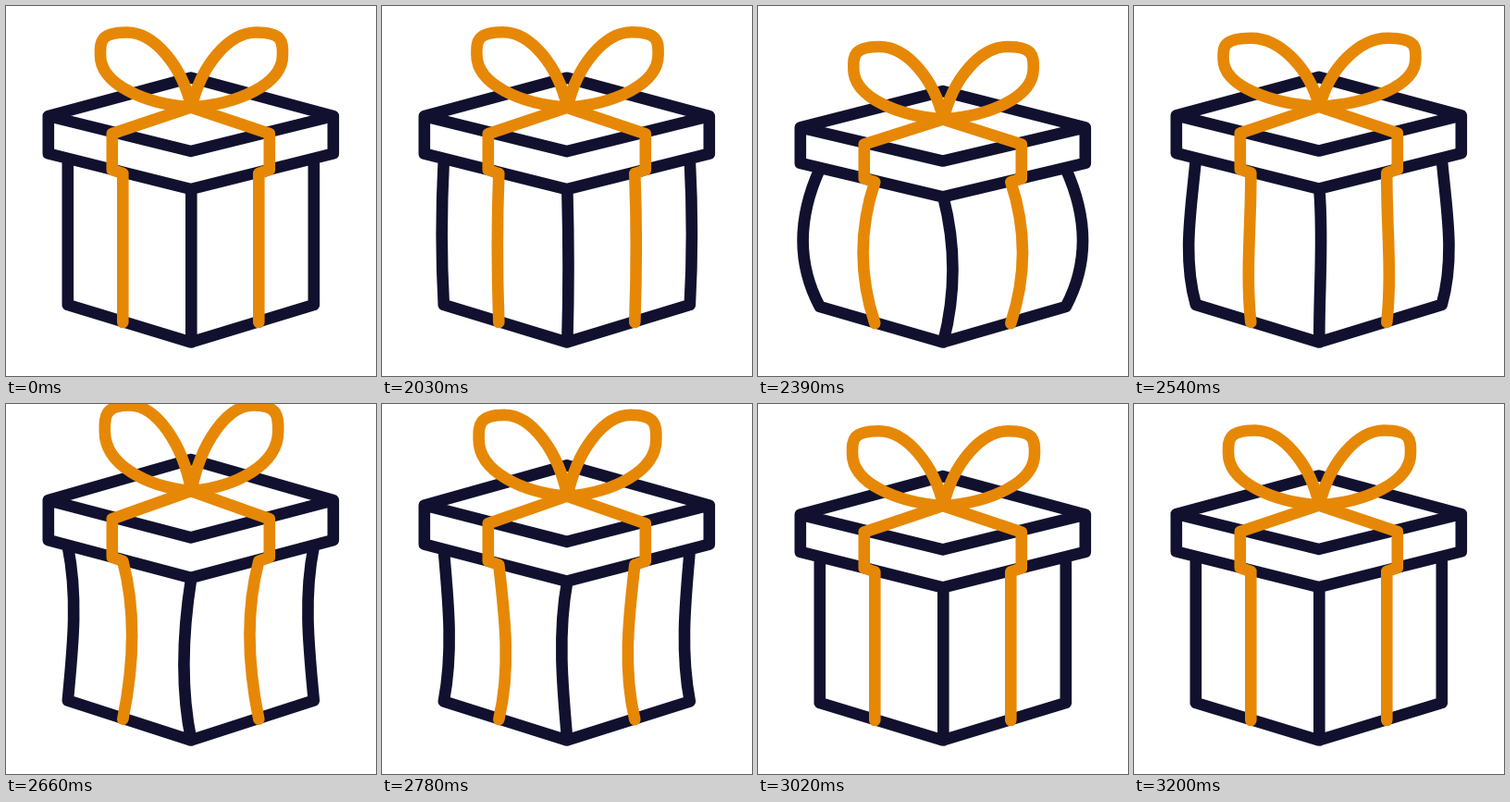
Animation of 400x400 px, one loop 3.23 s. Source, as an HTML page:

```html
<!DOCTYPE html>
<html lang="en">
<head>
<meta charset="utf-8">
<title>Gift box</title>
<style>
  html, body { margin: 0; height: 100%; overflow: hidden; background: #fff; }
  svg { display: block; width: 100vw; height: 100vh; }
  path { fill: none; stroke-width: 12.6; stroke-linecap: round; stroke-linejoin: round; }
</style>
</head>
<body>
<svg viewBox="0 0 400 400">
  <path id="box" stroke="#11112f"/>
  <path id="ribbon" stroke="#e68805"/>
</svg>
<script>
const LOOP = 3230, START = 2000, STEP = 30, BASE = 363.5, MID = 199.8;

// Swings between turning points [ms after START, value] with a cosine ease.
function swing(t, ...turns) {
  let value = turns[0][1];
  for (let i = 1; i < turns.length; i++) {
    const [t0, a] = turns[i - 1], [t1, b] = turns[i];
    const u = Math.min(1, (t - t0) / (t1 - t0));
    if (u > 0) value = a + (b - a) * (1 - Math.cos(Math.PI * u)) / 2;
  }
  return value;
}

// A turn before 0 mirrors the next one, so the swing starts from rest at speed.
const stretchAt = t => swing(t, [0, 1], [400, .949], [695, 1.065], [920, .982], [1080, 1.005], [1200, 1]);
const bulgeAt = t => swing(t, [-385, -17], [385, 17], [680, -15.5], [860, 0]);
const flopAt = t => swing(t, [-330, .6], [330, -.6], [540, 1.15], [670, -1.05], [900, 0]);

function draw(t) {
  const stretch = stretchAt(t), flop = flopAt(t);
  const upper = bulgeAt(t), lower = bulgeAt(t * .93);
  const puff = 8 * Math.sin(Math.PI * Math.min(1, t / 860));

  const pt = (x, y) => `${(MID + x).toFixed(2)} ${(BASE - (BASE - y) * stretch).toFixed(2)} `;
  const line = (...points) => 'M' + points.map(p => pt(...p)).join('L');
  const both = make => make(-1) + make(1);

  // Upright edge bent sideways by a and b at its thirds.
  const edge = (x, top, bottom, a, b) => {
    const third = (bottom - top) / 3;
    return 'M' + pt(x, top) + 'C' + pt(x + a, top + third) + pt(x + b, bottom - third) + pt(x, bottom);
  };

  const loop = side => {
    const knot = 109.5;
    const b = (x, y) => pt(.7 + side * x * (1 + .048 * flop), knot - (knot - y) * (1 - .075 * flop));
    return 'M' + b(0, knot) +
      'C' + b(10, 65) + b(40, 28.5) + b(70, 28.5) +
      'S' + b(98.5, 40) + b(98.5, 53) +
      'C' + b(98.5, 85) + b(50, 106) + b(0, knot);
  };

  const box =
    line([0, 77.5], [154, 119], [0, 157], [-154, 119]) + 'Z' +
    line([-154, 119], [-154, 159.5], [0, 198], [154, 159.5], [154, 119]) +
    line([-133, 323], [0, BASE], [133, 323]) +
    edge(.5, 198, BASE, lower * .8, upper * .8) +
    both(side => edge(side * 133, 166, 323, side * (upper + puff * .7), side * (lower + puff * 1.2)));

  const ribbon = both(side =>
    line([0, 109.5], [side * 85, 138], [side * 85, 177], [side * 73.5, 181]) +
    edge(side * 73.5, 181, 342, side * upper, side * lower) + loop(side));

  document.getElementById('box').setAttribute('d', box);
  document.getElementById('ribbon').setAttribute('d', ribbon);
}

const begin = performance.now();
function tick() {
  const t = (performance.now() - begin) % LOOP - START;
  draw(Math.max(0, Math.floor(t / STEP) * STEP));
  requestAnimationFrame(tick);
}
tick();
</script>
</body>
</html>
```
